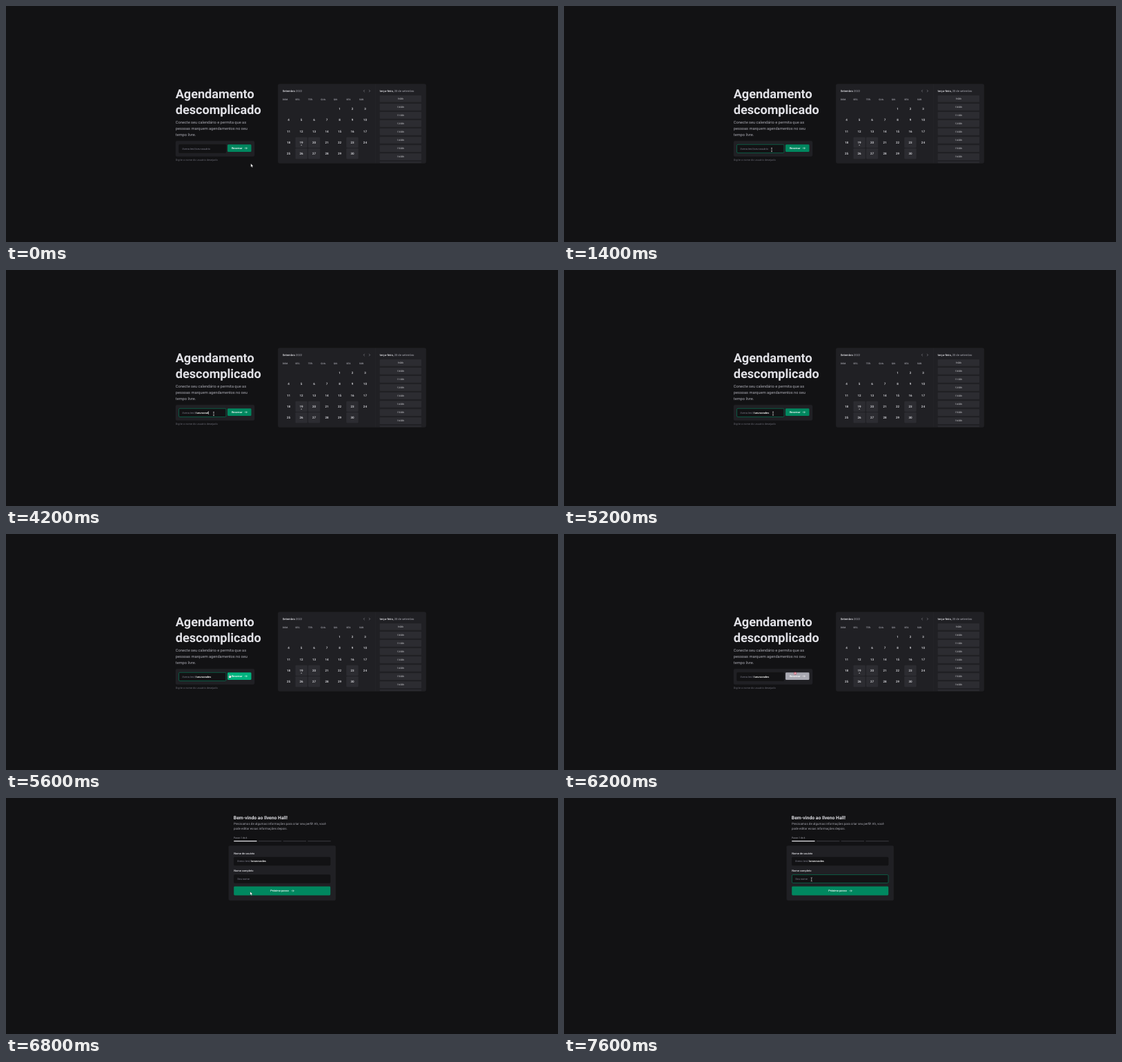
Write an HTML page that moves like this. It is 800 px wide and 343 px high and loops after 8000 ms.

```html
<!DOCTYPE html>
<html lang="pt-BR">
<head>
<meta charset="utf-8">
<title>Agendamento</title>
<style>
  html, body { margin: 0; width: 100%; height: 100%; overflow: hidden; background: #121214; }
  svg { display: block; width: 800px; height: 343px; }
  text { font: 3.96px Roboto, sans-serif; fill: #e1e1e6; text-rendering: geometricPrecision; white-space: pre; }
  .title { font-size: 18.1px; font-weight: 700; }
  .lead { font-size: 5.66px; fill: #a9a9b2; }
  .welcome { font-size: 6.8px; font-weight: 700; }
  .body { font-size: 4.53px; fill: #a9a9b2; }
  .step { font-size: 3.4px; fill: #a9a9b2; }
  .dim { fill: #7c7c8a; }
  .faint { fill: #65656f; }
  .bold, .btn text { font-weight: 500; }
  .btn text { fill: #fff; }
  .head { font-size: 4.15px; }
  .soft { fill: #a9a9b2; font-weight: 400; }
  .week { font-size: 3.3px; fill: #a9a9b2; font-weight: 500; }
  .day { font-size: 4.5px; font-weight: 500; text-anchor: middle; }
  .slot { font-size: 3.35px; text-anchor: middle; }
  .status { font-size: 3.5px; fill: #7b7074; }
  .card { fill: #202024; stroke: #29292e; stroke-width: .28; }
  .field { fill: #121214; stroke: #121214; stroke-width: .57; }
  .field.focus { stroke: #00875f; }
  .btn rect { fill: #00875f; }
  .btn.hover rect { fill: #00b37e; }
  .btn.busy rect { fill: #a9a9b2; }
  .caret { fill: #fff; }
  .line { fill: none; stroke: #fff; stroke-width: .5; }
</style>
</head>
<body>
<svg viewBox="0 0 800 343">
  <defs>
    <path id="arrow" class="line" d="M0 0h3.7M2.2-1.5 3.7 0 2.2 1.5"/>
  </defs>

  <g id="home">
    <text class="title" x="245.7" y="134.4">Agendamento</text>
    <text class="title" x="245.7" y="157.1">descomplicado</text>
    <text class="lead" x="245.8" y="170.9">Conecte seu calendário e permita que as</text>
    <text class="lead" x="245.8" y="179.9">pessoas marquem agendamentos no seu</text>
    <text class="lead" x="245.8" y="189">tempo livre.</text>

    <rect class="card" x="246" y="196.2" width="114" height="22.2" rx="1.7"/>
    <rect id="userField" class="field" x="250.5" y="201.3" width="68.4" height="12.2" rx="1.5"/>
    <text x="255.6" y="208.9"><tspan id="prefix" class="dim">ilveno.test/</tspan><tspan id="typed" class="bold" fill="#fff"></tspan><tspan id="hint" class="dim">seu-usuário</tspan></text>
    <rect id="userCaret" class="caret" y="205.2" width=".5" height="4.8"/>
    <g id="reserve" class="btn">
      <rect x="321" y="201.3" width="34.5" height="10.8" rx="1.4"/>
      <text x="326.9" y="208.1">Reservar</text>
      <use href="#arrow" x="345.7" y="206.7"/>
    </g>
    <text class="faint" x="245.8" y="225.2">Digite o nome do usuário desejado</text>

    <rect class="card" x="394.3" y="113.4" width="214.4" height="115" rx="2"/>
    <path d="M535.5 113.5V228.3" stroke="#29292e" stroke-width=".4"/>
    <text class="head bold" x="400.8" y="124.9">Setembro <tspan class="soft">2022</tspan></text>
    <path class="line" style="stroke:#a9a9b2" d="M519.8 121.9 518.2 123.5 519.8 125.1M526 121.9 527.6 123.5 526 125.1"/>
    <text class="head bold" x="541.6" y="124.9">terça-feira, <tspan class="soft">20 de setembro</tspan></text>
    <g id="calendar"></g>
    <circle cx="428.1" cy="202.2" r=".6" fill="#e1e1e6"/>
    <rect x="541.6" y="226" width="60.5" height="2.3" rx=".8" fill="#29292e"/>
  </g>

  <g id="signup">
    <text class="welcome" x="329.8" y="30.8">Bem-vindo ao Ilveno Hall!</text>
    <text class="body" x="329.9" y="39">Precisamos de algumas informações para criar seu perfil! Ah, você</text>
    <text class="body" x="329.9" y="46.2">pode editar essas informações depois.</text>
    <text class="step" x="330" y="59.2">Passo 1 de 4</text>
    <g id="steps"></g>
    <rect class="card" x="322.7" y="69.6" width="155" height="79.2" rx="1.7"/>
    <text class="bold" x="330.2" y="81.6">Nome de usuário</text>
    <rect class="field" x="330.4" y="86" width="139.6" height="12" rx="1.5"/>
    <text class="dim" x="335.2" y="93.4">ilveno.test/<tspan class="bold" fill="#fff" style="fill:#fff">tarunovades</tspan></text>
    <text class="bold" x="330.2" y="107">Nome completo</text>
    <rect id="nameField" class="field" x="330.4" y="111.5" width="139.6" height="12" rx="1.5"/>
    <text class="dim" x="335.2" y="118.9">Seu nome</text>
    <rect id="nameCaret" class="caret" x="335.1" y="115.1" width=".5" height="4.8"/>
    <g class="btn">
      <rect x="330.2" y="128.4" width="140" height="13" rx="1.4"/>
      <text x="383.3" y="136.3">Próximo passo</text>
      <use href="#arrow" x="413.6" y="134.9"/>
    </g>
    <g id="status">
      <rect y="337" width="263.5" height="6" fill="#1b191c"/>
      <text class="status" x="-5" y="341.3">Aguardando localhost...</text>
    </g>
  </g>

  <g id="cursor">
    <path id="pointer" d="M0 0V5L1.15 4 1.95 5.8 2.8 5.4 2 3.7H3.6Z" fill="#fff" stroke="#000" stroke-width=".25"/>
    <path id="beam" class="line" d="M-1-2.7Q0-2.7 0-2 0-2.7 1-2.7M0-2V2M-1 2.7Q0 2.7 0 2 0 2.7 1 2.7"/>
    <path id="hand" d="M-.5-.7Q0-1.3.5-.7V1.2L2.2 1.7V3.3L1.5 4.7H-.8L-2 2.4-1.4 1.9-.5 2.6Z" fill="#fff" stroke="#000" stroke-width=".25"/>
    <path id="denied" d="M1.6 0A1.6 1.6 0 1 1-1.6 0 1.6 1.6 0 1 1 1.6 0M-1.1-1.1 1.1 1.1" fill="#fff" stroke="#c22742" stroke-width=".65"/>
  </g>
</svg>

<script>
const LOOP = 8000, TICK = 200, USER = 'tarunovades';
const $ = id => document.getElementById(id);
const show = (id, on) => { $(id).style.display = on ? '' : 'none'; };
const within = (t, a, b) => t >= a && t < b;

function add(parent, tag, attrs, label) {
  const el = document.createElementNS('http://www.w3.org/2000/svg', tag);
  for (const key in attrs) el.setAttribute(key, attrs[key]);
  if (label !== undefined) el.textContent = label;
  $(parent).append(el);
}

function buildCalendar() {
  ['DOM.', 'SEG.', 'TER.', 'QUA.', 'QUI.', 'SEX.', 'SÁB.'].forEach((name, i) =>
    add('calendar', 'text', { class: 'week', x: 400.8 + 18.5 * i, y: 137.2 }, name));
  const open = [19, 20, 23, 26, 27, 30];
  for (let day = 1; day <= 30; day++) {
    const col = (day + 3) % 7, row = Math.floor((day + 3) / 7);
    const x = 409.6 + 18.47 * col, y = 149.5 + 16.25 * row;
    if (open.includes(day))
      add('calendar', 'rect', { x: x - 8.7, y: y - 7.4, width: 17.4, height: 15.2, rx: 1.2, fill: '#2c2c31' });
    add('calendar', 'text', { class: 'day', x, y: y + 1.5 }, day);
  }
  for (let i = 0; i < 8; i++) {
    const y = 134.8 + 12.05 * i;
    add('calendar', 'rect', { x: 541.6, y: y - 4.9, width: 60.5, height: 9.7, rx: 1.2, fill: '#2c2c31' });
    add('calendar', 'text', { class: 'slot', x: 571.9, y: y + 1.2 }, `${9 + i}:00h`);
  }
}

function buildSteps() {
  for (let i = 0; i < 4; i++)
    add('steps', 'rect', { x: 330.2 + 35.7 * i, y: 62, width: 33.4, height: 1.15, rx: .2, fill: i ? '#323238' : '#e1e1e6' });
}

// Each move: start, end, from x, from y, to x, to y
const moves = [
  [0, 800, 354.8, 229, 301, 209],
  [5000, 6000, 301, 209, 335, 202.6],
  [6400, 7000, 335.5, 202, 358.7, 118.4]
];

function cursorAt(t) {
  const [a, b, x0, y0, x1, y1] = moves.filter(m => t >= m[0]).pop();
  const p = Math.min(1, (t - a) / (b - a));
  const e = p * p * p * (p * (6 * p - 15) + 10);
  return [x0 + (x1 - x0) * e, y0 + (y1 - y0) * e];
}

function typedCount(t) {
  if (t < 2000) return 0;
  if (t < 3000) return Math.floor((t - 2000) / TICK) + 1;
  if (t < 4000) return 7;
  return Math.min(USER.length, 8 + Math.floor((t - 4000) / TICK));
}

function draw(t) {
  const home = t < 6400, busy = within(t, 6200, 6400);
  show('home', home);
  show('signup', !home);

  const count = typedCount(t);
  $('typed').textContent = USER.slice(0, count);
  show('hint', !count);
  $('userField').classList.toggle('focus', within(t, 1000, 6000));
  show('userCaret', within(t, 1000, 1400) || within(t, 2000, 3600) || within(t, 4000, 5200));
  if (home) {
    const end = $('prefix').getComputedTextLength() + (count ? $('typed').getComputedTextLength() : 0);
    $('userCaret').setAttribute('x', 255.6 + end);
  }

  const [x, y] = cursorAt(t);
  const onButton = home && x > 321 && y < 212;
  const onField = home ? x < 319 && y < 213.5 : within(y, 111.5, 123.5);
  $('reserve').classList.toggle('hover', onButton && !busy);
  $('reserve').classList.toggle('busy', busy);
  $('cursor').setAttribute('transform', `translate(${x} ${y})`);
  show('beam', onField);
  show('hand', onButton && !busy);
  show('denied', busy);
  show('pointer', !onField && !onButton);

  $('nameField').classList.toggle('focus', t >= 7200);
  show('nameCaret', within(t, 7200, 7600));
  show('status', within(t, 6400, 6600));
}

buildCalendar();
buildSteps();
const start = performance.now();
function frame() {
  const t = (performance.now() - start) % LOOP;
  draw(Math.floor(t / TICK) * TICK);
  requestAnimationFrame(frame);
}
frame();
</script>
</body>
</html>
```
